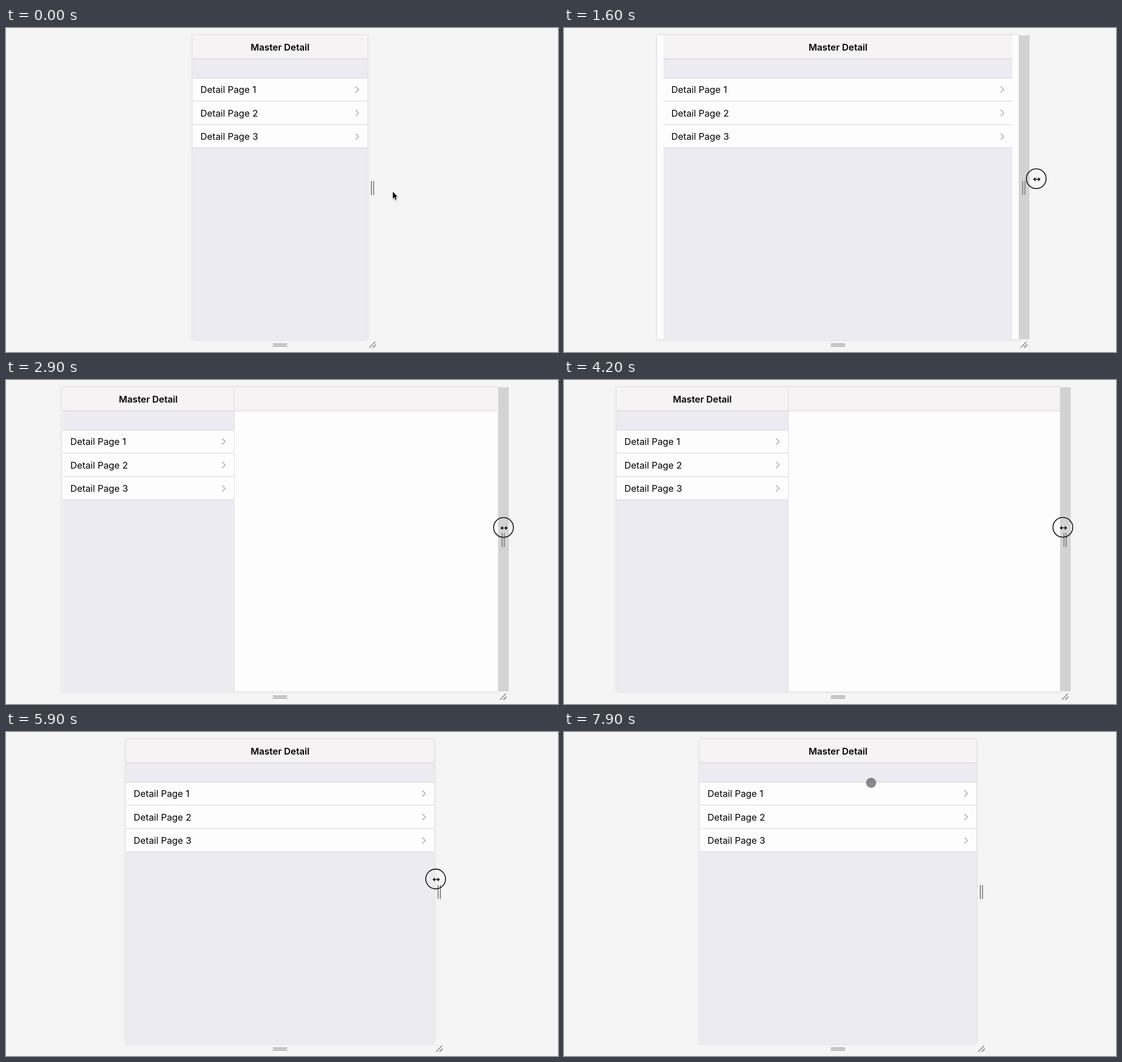
Recreate the animation shown at these times as an HTML page with a canvas. Size 976 by 574 pixels, loop 8000 ms.

```html
<!DOCTYPE html>
<html lang="en">
<head>
<meta charset="utf-8">
<title>Master Detail</title>
<style>
  html, body { margin: 0; width: 100%; height: 100%; overflow: hidden; background: #f5f5f5; }
  canvas { display: block; }
</style>
</head>
<body>
<canvas id="stage" width="976" height="574"></canvas>
<script>
const ctx = document.getElementById('stage').getContext('2d');
const LOOP = 8000, STEP = 100;
const CENTER = 484.5, TOP = 13, BOTTOM = 551.5;
const START_HALF = 154.5, SPLIT_HALF = 363, MASTER = 303, BAR = 19;
const BACK = '#f5f5f5', HEAD = '#f5f3f4', LAVENDER = '#ecebf1', WHITE = '#fdfdfd',
      RULE = '#d4d3d8', GRIP = '#8e8e8e';

// Each drag takes the panel to a new half-width; its content follows a little late.
const drags = [
  { from: 800, to: 1650, half: 341, power: 2, lag: 27 },
  { from: 2400, to: 2970, half: 392, power: 1, lag: 10 },
  { from: 4350, to: 5250, half: 319.5, power: .84, lag: 145 },
  { from: 5250, to: 6600, half: 244.5, power: .64, lag: 0 }
];
const glides = [
  { from: 0, to: 600, x: 649, y: 284 },
  { from: 800, to: 1600, x: 835, y: 267 },
  { from: 2350, to: 3000, x: 882, y: 261 },
  { from: 4350, to: 5250, x: 800, y: 261 },
  { from: 5250, to: 6600, x: 738, y: 260 },
  { from: 7100, to: 7900, x: 543, y: 90 }
];

const progress = (move, t) => Math.min(1, Math.max(0, (t - move.from) / (move.to - move.from)));
const easeOut = p => 1 - (1 - p) ** 1.6;

function halfAt(t) {
  return drags.reduce((half, d) => half + (d.half - half) * progress(d, t) ** d.power, START_HALF);
}

function lagAt(t) {
  return drags.reduce((lag, d) => t >= d.from ? d.lag : lag, 0);
}

function pointerAt(t) {
  let x = 684, y = 290;
  for (const g of glides) {
    const p = easeOut(progress(g, t));
    x += (g.x - x) * p;
    y += (g.y - y) * p;
  }
  return [x, y];
}

function rect(color, x1, y1, x2, y2) {
  ctx.fillStyle = color;
  ctx.fillRect(x1, y1, x2 - x1, y2 - y1);
}

function path(...points) {
  ctx.beginPath();
  points.forEach(([x, y]) => ctx.lineTo(x, y));
}

function line(color, width, ...points) {
  ctx.strokeStyle = color;
  ctx.lineWidth = width;
  path(...points);
  ctx.stroke();
}

function disc(x, y, r) {
  ctx.beginPath();
  ctx.arc(x, y, r, 0, Math.PI * 2);
}

function text(str, x, y, font, align) {
  ctx.font = `${font} Inter, "Liberation Sans", sans-serif`;
  ctx.textAlign = align;
  ctx.fillStyle = '#000';
  ctx.fillText(str, x, y);
}

function drawFrame(left, right) {
  ctx.save();
  ctx.shadowColor = 'rgba(0,0,0,.14)';
  ctx.shadowBlur = 5;
  rect(WHITE, left, TOP, right, BOTTOM);
  ctx.restore();
}

function drawGrips(right) {
  for (const d of [7, 11]) rect(GRIP, right + d - 1, 271, right + d + 1, 296);
  for (const y of [560, 563.5]) rect(GRIP, 472, y - .75, 497, y + .75);
  line(GRIP, 1.8, [right + 3.5, 566.5], [right + 14, 555.5]);
  line(GRIP, 1.8, [right + 9.5, 566.5], [right + 15, 561]);
}

function drawContent(half) {
  const left = Math.round(CENTER - half), right = Math.round(CENTER + half);
  const split = half >= SPLIT_HALF, edge = split ? left + MASTER : right;

  rect(HEAD, left, TOP, right, 55);
  rect(LAVENDER, left, 55, edge, BOTTOM);
  rect(WHITE, left, 88, edge, 213);
  if (split) {
    rect(WHITE, edge, 55, right, BOTTOM);
    rect('#dddce1', edge, TOP, edge + 1, BOTTOM);
  }
  for (const y of [54, 88, 129, 171, 212]) rect(RULE, left, y, y === 54 ? right : edge, y + 1);

  text('Master Detail', (left + edge) / 2, 40, '600 16.3px', 'center');
  for (let i = 0; i < 3; i++) {
    const y = 109 + i * 41.6;
    text('Detail Page ' + (i + 1), left + 13.8, y + 6, '400 16.3px', 'left');
    line('#b9b9bd', 1.8, [edge - 21, y - 5.5], [edge - 15.5, y], [edge - 21, y + 5.5]);
  }
}

function drawArrow(x, y) {
  ctx.save();
  ctx.translate(x, y);
  ctx.scale(.9, .95);
  path([0, 0], [0, 13], [3, 10.3], [5, 15], [7.2, 14], [5.2, 9.5], [9, 9.3]);
  ctx.closePath();
  ctx.strokeStyle = '#fff';
  ctx.lineWidth = 2;
  ctx.shadowColor = 'rgba(0,0,0,.35)';
  ctx.shadowBlur = 2;
  ctx.shadowOffsetY = 1;
  ctx.stroke();
  ctx.shadowColor = 'transparent';
  ctx.fillStyle = '#000';
  ctx.fill();
  ctx.restore();
}

function drawResize(x, y) {
  for (const [color, width] of [['rgba(255,255,255,.8)', 3.5], ['#111', 1.6]]) {
    line(color, width, [x - 4, y], [x + 4, y]);
    for (const s of [-1, 1]) {
      path([x + s * 6.5, y], [x + s * 2.5, y - 3.7], [x + s * 2.5, y + 3.7]);
      ctx.fillStyle = color;
      ctx.fill();
    }
  }
}

function drawPointer(t, right) {
  const [x, y] = pointerAt(t);
  if (t > 7000 && x < right) {
    disc(x, y, 9);
    ctx.fillStyle = 'rgba(98,99,95,.75)';
    ctx.fill();
  } else if (t < 500) {
    drawArrow(x, y);
  } else {
    drawResize(x + 1, y + 1);
    if (t >= 800 && t < 6600) {
      disc(x, y, 17.5);
      ctx.strokeStyle = '#111';
      ctx.lineWidth = 1.6;
      ctx.stroke();
    }
  }
}

function draw(t) {
  const half = halfAt(t), inner = halfAt(t - lagAt(t));
  const left = Math.round(CENTER - half), right = Math.round(CENTER + half);
  const hovering = (t >= 500 && t < 4400) || (t >= 6600 && t < 7200);

  rect(BACK, 0, 0, 976, 574);
  drawFrame(left, right);
  if (hovering) rect('#d3d3d3', right, TOP, right + BAR, BOTTOM);
  else if (inner > half) rect(LAVENDER, right, 55, right + BAR, BOTTOM);
  drawGrips(right);
  drawContent(inner);
  drawPointer(t, right);
}

function tick() {
  const t = performance.now() % LOOP;
  draw(Math.floor(t / STEP) * STEP);
  requestAnimationFrame(tick);
}
tick();
</script>
</body>
</html>
```
